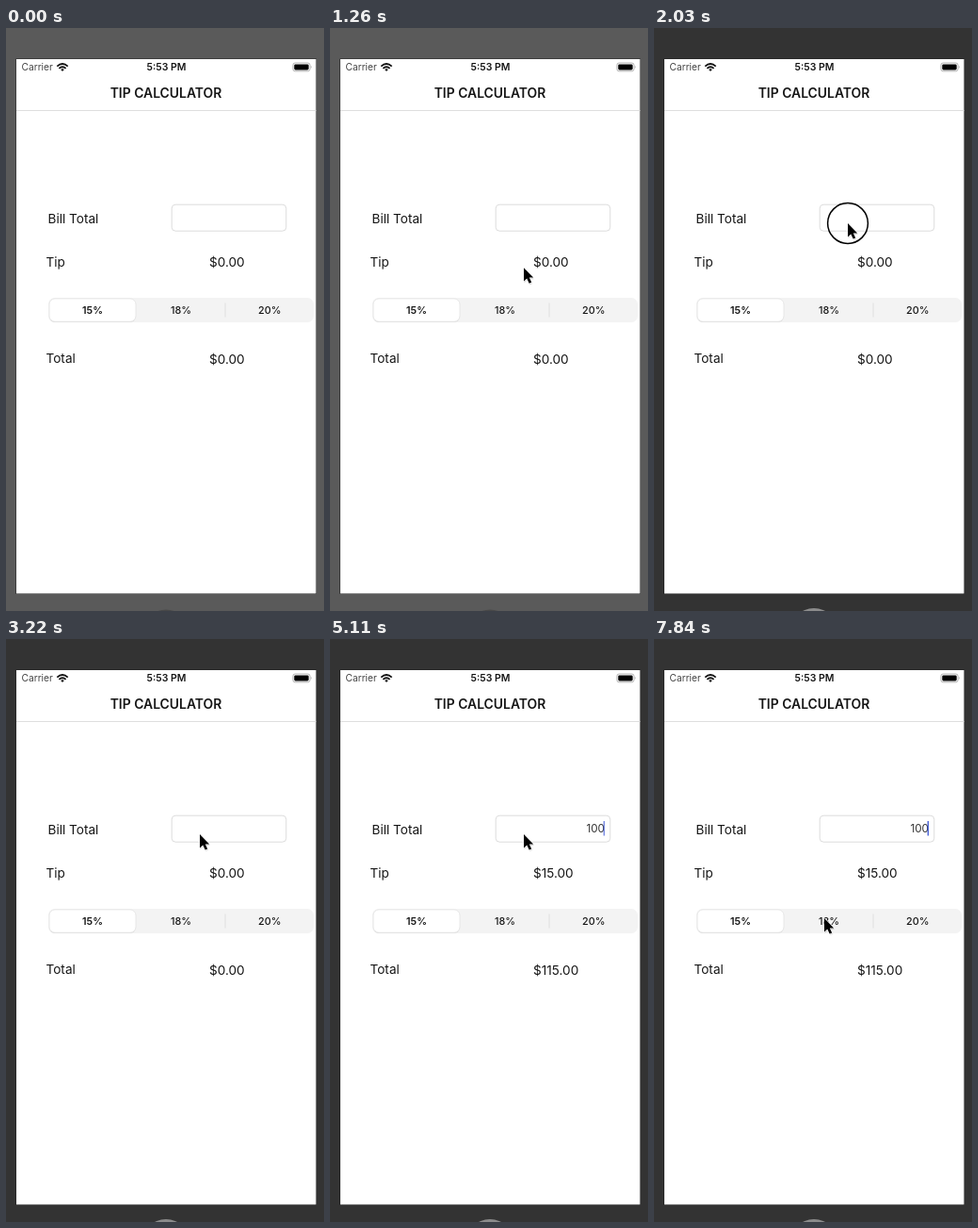
Animation of 338x618 px, one loop 8000 ms. Source, as an HTML page:

```html
<!DOCTYPE html>
<html lang="en">
<head>
<meta charset="utf-8">
<title>Tip calculator</title>
<style>
  html, body { margin: 0; width: 100%; height: 100%; overflow: hidden; }
  svg { display: block; width: 338px; height: 618px; font: 13.6px Inter, sans-serif; fill: #161616; }
  .mid { text-anchor: middle; }
  .seg { font-size: 10.8px; font-weight: 500; text-anchor: middle; }
  .bold { font-weight: 600; }
</style>
</head>
<body>
<svg viewBox="0 0 338 618">
  <rect id="bezel" width="338" height="618"/>
  <circle id="home" cx="170" cy="640.5" r="25.5"/>
  <rect x="10.5" y="32.5" width="319.5" height="567.5" fill="#222"/>
  <rect x="11" y="33" width="318.5" height="566.5" fill="#fff"/>

  <text x="16.5" y="45.3" font-size="10.2" fill="#444">Carrier</text>
  <g fill="none" stroke="#111" stroke-width="1.8">
    <path d="M54.3 40.6Q60 35.4 65.7 40.6M56.4 42.9Q60 39.7 63.6 42.9"/>
    <path d="M58.2 44L60 46L61.8 44Q60 42.7 58.2 44Z" fill="#111" stroke="none"/>
  </g>
  <text class="mid bold" x="170.5" y="45.3" font-size="10.5">5:53 PM</text>
  <rect x="304.9" y="37" width="18.2" height="8.8" rx="2.4" fill="#fff" stroke="#aaa" stroke-width=".9"/>
  <rect x="306.3" y="38.4" width="15.4" height="6" rx="1.3" fill="#000"/>
  <path d="M324.3 39.8q1.6 1.6 0 3.2z" fill="#aaa"/>
  <text class="mid bold" x="170" y="73.8" font-size="13.9">TIP CALCULATOR</text>
  <path d="M11 87.5H329.5" stroke="#dedede"/>

  <text x="44.5" y="206.8">Bill Total</text>
  <rect x="176.2" y="187.2" width="121.6" height="28" rx="4" fill="#fff" stroke="#dcdcdc"/>
  <text id="bill" x="292" y="205.2" font-size="11.7" text-anchor="end" fill="#333"></text>
  <rect id="caret" x="290.6" y="193" width="1.5" height="15.5" fill="#4a62d8"/>

  <text x="42.5" y="252.5">Tip</text>
  <text id="tip" x="216" y="252.7"></text>

  <rect x="45" y="286" width="282" height="26" rx="6.5" fill="#f3f3f3"/>
  <rect x="46" y="288" width="92" height="24" rx="6" fill="#dedede"/>
  <rect x="46" y="286.9" width="92" height="24.3" rx="6" fill="#fff" stroke="#e2e2e2" stroke-width=".8"/>
  <path d="M233 291.5V306.5" stroke="#dedede"/>
  <text class="seg bold" x="92" y="302.9">15%</text>
  <text class="seg" x="186" y="302.9">18%</text>
  <text class="seg" x="280.3" y="302.9">20%</text>

  <text x="42.5" y="354.5">Total</text>
  <text id="total" x="216" y="355.7"></text>

  <circle id="click" cx="206" cy="207" r="21.4" fill="none" stroke="#000" stroke-width="1.5"/>
  <g id="cursor">
    <path d="M.5 1.5V16L4 13L6.3 18L9 17L6.7 12H11Z" opacity=".15"/>
    <path d="M0 0V14.4L3.3 11.4L5.7 16.5L8.2 15.4L5.8 10.4H10.2Z" fill="#000" stroke="#fff" stroke-width="1.1" paint-order="stroke"/>
  </g>
</svg>
<script>
const LOOP = 8000, STEP = 70, RATE = 0.15;
const $ = id => document.getElementById(id);
const clamp = v => Math.min(1, Math.max(0, v));
const span = (t, a, b) => clamp((t - a) / (b - a));
const mix = (a, b, p) => a + (b - a) * p;
const easeOut = (p, power) => 1 - (1 - p) ** power;
const smooth = p => p * p * (3 - 2 * p);
const money = v => "$" + v.toFixed(2);

function cursorAt(t) {
  if (t < 980) {
    const p = span(t, 490, 840);
    return [mix(178, 206, easeOut(p, 1.25)), mix(606, 288, easeOut(p, 2))];
  }
  if (t < 7000) return [206, mix(288, 207, smooth(span(t, 980, 1610)))];
  const go = easeOut(span(t, 7000, 7490), 1.6), settle = span(t, 7630, 7840);
  return [mix(206, 184, go) - 3 * settle, mix(207, 290, go) + 6 * settle];
}

function caretAt(t) {
  if (t < 2520) return 0;
  if (t >= 4060 && t < 4620) return 1; // stays lit while typing
  const phase = (t - 2520) % 1050;
  return phase < 420 ? span(phase, -70, 70) : 1 - span(phase, 420, 700);
}

function draw(t) {
  const active = t >= 2030;
  $("bezel").setAttribute("fill", active ? "#333" : "#5a5a5a");
  $("home").setAttribute("fill", active ? "#8c8c8c" : "#484848");
  $("home").setAttribute("cy", active ? 640.5 : 642);

  const typed = "100".slice(0, [4130, 4410, 4550].filter(at => t >= at).length);
  const bill = Number(typed);
  $("bill").textContent = typed;
  $("tip").textContent = money(bill * RATE);
  $("total").textContent = money(bill * (1 + RATE));
  $("caret").setAttribute("opacity", caretAt(t));

  $("click").setAttribute("opacity", t >= 1960 && t < 2170 ? 1 : 0);
  $("cursor").setAttribute("opacity", t < 490 ? 0 : 1);
  $("cursor").setAttribute("transform", `translate(${cursorAt(t)})`);
}

const start = performance.now();
function tick() {
  const t = (performance.now() - start) % LOOP;
  draw(Math.floor(t / STEP) * STEP);
  requestAnimationFrame(tick);
}
tick();
</script>
</body>
</html>
```
